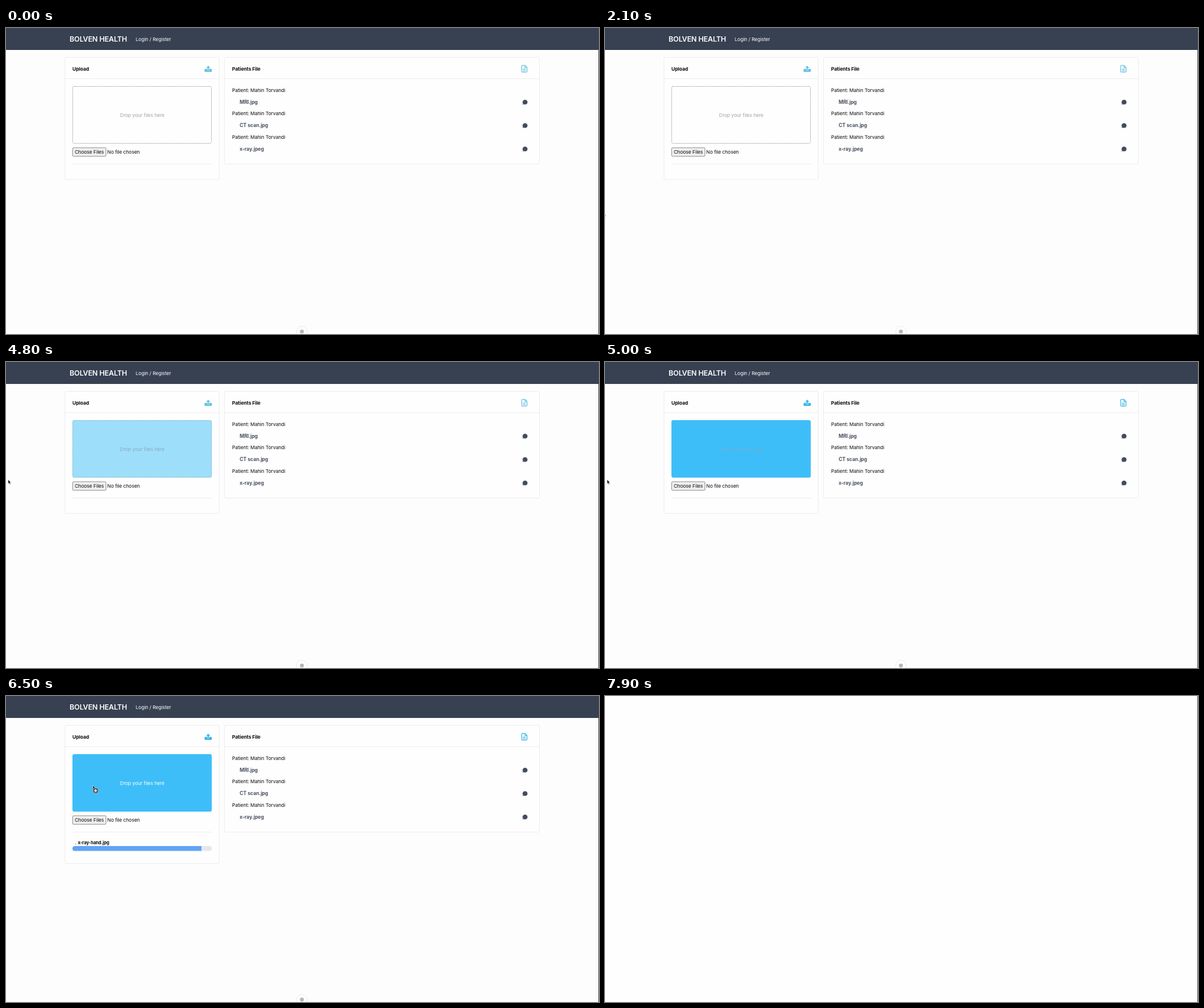
Write an HTML page that moves like this. It is 1000 px wide and 516 px high and loops after 8 s.

```html
<!DOCTYPE html>
<html lang="en">
<head>
<meta charset="utf-8">
<title>Patient file upload</title>
<style>
html, body { margin: 0; width: 100%; height: 100%; overflow: hidden; background: #fefefe; }
svg { display: block; width: 100vw; height: 100vh; }
text { font: 400 8.2px Inter, Roboto, sans-serif; letter-spacing: -.07px; fill: #0b0b0b; white-space: pre; }
.brand { font-size: 12px; font-weight: 600; letter-spacing: -.15px; }
.light { fill: #fff; }
.head { font-weight: 700; }
.file { font-size: 8.3px; font-weight: 700; fill: #4b5260; }
.small { font-size: 7.35px; font-weight: 700; }
.mid { text-anchor: middle; }
.card { fill: #fefefe; stroke: #ededee; }
.rule { stroke: #ededee; }
</style>
</head>
<body>
<svg viewBox="0 0 1000 516" preserveAspectRatio="none">
  <defs>
    <clipPath id="pill"><rect x="112" y="253" width="235" height="8.5" rx="4.2"/></clipPath>
    <path id="bubble" d="M0-4.1C2.4-4.1 4.2-2.4 4.2 0S2.4 4.1 0 4.1C-.8 4.1-1.6 3.9-2.2 3.6L-4.3 4.2-3.4 2.3C-3.9 1.6-4.2.9-4.2 0-4.2-2.4-2.4-4.1 0-4.1Z" fill="#434c5d"/>
  </defs>
  <rect width="1000" height="516" fill="#fefefe"/>
  <g id="page">
    <rect width="1000" height="516" fill="#fdfdfd"/>
    <rect width="1000" height="37" fill="#384152"/>
    <text class="brand light" x="107.3" y="22.8">BOLVEN HEALTH</text>
    <text class="light" x="218.8" y="22.3">Login / Register</text>

    <rect id="upload" class="card" x="99.5" y="49.5" width="260" height="206" rx="2.5"/>
    <path class="rule" d="M100 85.5H359M112 229.5H347"/>
    <text class="head" x="112" y="72">Upload</text>

    <rect class="card" x="368.5" y="49.5" width="531" height="180" rx="2.5"/>
    <path class="rule" d="M369 85.5H899"/>
    <text class="head" x="381.3" y="72">Patients File</text>
    <g id="rows"></g>

    <g id="icons" fill="currentColor">
      <rect x="334.8" y="69.1" width="12.4" height="5" rx="1.3"/>
      <path d="M341 63.3L345 67.4H342.3V71.3H339.7V67.4H337Z" stroke="#fefefe" stroke-width=".5"/>
      <path d="M870.7 63.2H875.4L878.6 66.4V73.3Q878.6 74.4 877.5 74.4H870.7Q869.6 74.4 869.6 73.3V64.3Q869.6 63.2 870.7 63.2ZM875.2 63.4V66.7H878.4M871.6 69.3H876.6M871.6 71.8H876.6" fill="none" stroke="currentColor" stroke-width="1.2"/>
    </g>

    <rect id="zone" x="112.5" y="98.5" width="234" height="96" rx="2" stroke-width=".9"/>
    <text id="hint" class="mid" x="229.8" y="149.7">Drop your files here</text>

    <rect x="112.4" y="201.9" width="56.2" height="14.4" rx="1.4" fill="#efefef" stroke="#767676" stroke-width=".8"/>
    <text class="mid" x="140.5" y="212.1">Choose Files</text>
    <text x="170.8" y="212.1">No file chosen</text>

    <g id="job">
      <circle cx="117.4" cy="249.4" r=".6" fill="#555"/>
      <text class="small" x="121.2" y="250.1">x-ray-hand.jpg</text>
      <g clip-path="url(#pill)">
        <rect x="112" y="253" width="235" height="8.5" fill="#e5e7eb"/>
        <rect id="bar" x="112" y="253" height="8.5" fill="#60a5f5"/>
      </g>
    </g>

    <circle cx="499" cy="512" r="9" fill="#fefefe" stroke="#ebebeb"/>
    <circle cx="499" cy="511.8" r="3.4" fill="#b4b7ba"/>

    <g id="cursor">
      <path d="M0 0V7.2L1.7 5.7 2.8 8.2 4 7.7 2.9 5.3H5Z" fill="#111" stroke="#fff" stroke-width=".5"/>
      <g id="badge">
        <circle cx="4.5" cy="8.7" r="4.9" fill="#505a64" stroke="#c9d3da" stroke-width=".6"/>
        <path d="M4.5 6.1V11.3M1.9 8.7H7.1" stroke="#fff" stroke-width="1.3"/>
      </g>
    </g>
  </g>
  <rect x="999" width="1" height="516" fill="#4a4b4d"/>
</svg>
<script>
const LOOP = 8000;
const $ = id => document.getElementById(id);
const set = (id, attrs) => {
  for (const k in attrs) $(id).setAttribute(k, attrs[k]);
};
const show = (id, on) => set(id, { visibility: on ? 'inherit' : 'hidden' });
const ramp = (t, a, b) => Math.min(1, Math.max(0, (t - a) / (b - a)));
const smooth = p => p * p * (3 - 2 * p);
const lerp = (a, b, p) => a + (b - a) * p;
const mix = (a, b, p) => `rgb(${a.map((v, i) => Math.round(lerp(v, b[i], p)))})`;

const WHITE = [254, 254, 254], BLUE = [62, 190, 248], GREY = [160, 163, 167];

$('rows').innerHTML = ['MRI.jpg', 'CT scan.jpg', 'x-ray.jpeg'].map((name, i) => {
  const y = 107.5 + i * 39.5;
  return `<text x="381.3" y="${y}">Patient: Mahin Torvandi</text>
    <text class="file" x="394" y="${y + 20}">${name}</text>
    <use href="#bubble" x="875.3" y="${y + 17.5}"/>`;
}).join('');

function cursorAt(t) {
  if (t < 3700) return [-3.4, 311.5];
  const p = smooth(ramp(t, 5300, 5700));
  return [lerp(3.6, 146.6, p), lerp(198.2, 150.9, p)];
}

function draw(t) {
  show('page', t < 7900);

  const hot = smooth(ramp(t, 4600, 5000));
  const lit = hot === 1;
  set('zone', {
    fill: mix(WHITE, BLUE, hot),
    stroke: mix([150, 152, 156], BLUE, hot),
    'stroke-dasharray': lit ? 'none' : '1.8 1.2'
  });
  const dim = mix(GREY, [112, 176, 208], hot);
  $('hint').style.fill = t < 5100 ? dim : '#fff';
  $('icons').style.color = t < 4900 ? '#67c2e3' : '#3ab7e9';

  const sent = t >= 6100;
  show('job', sent);
  set('upload', { height: sent ? 233 : 206 });
  set('bar', { width: 235 * Math.min(1, .925 * ramp(t, 6100, 6500) + .075 * ramp(t, 6500, 6600)) });

  show('cursor', t >= 2100);
  show('badge', t >= 5300);
  set('cursor', { transform: `translate(${cursorAt(t)})` });
}

const start = performance.now();
function tick() {
  draw((performance.now() - start) % LOOP);
  requestAnimationFrame(tick);
}
tick();
</script>
</body>
</html>
```
